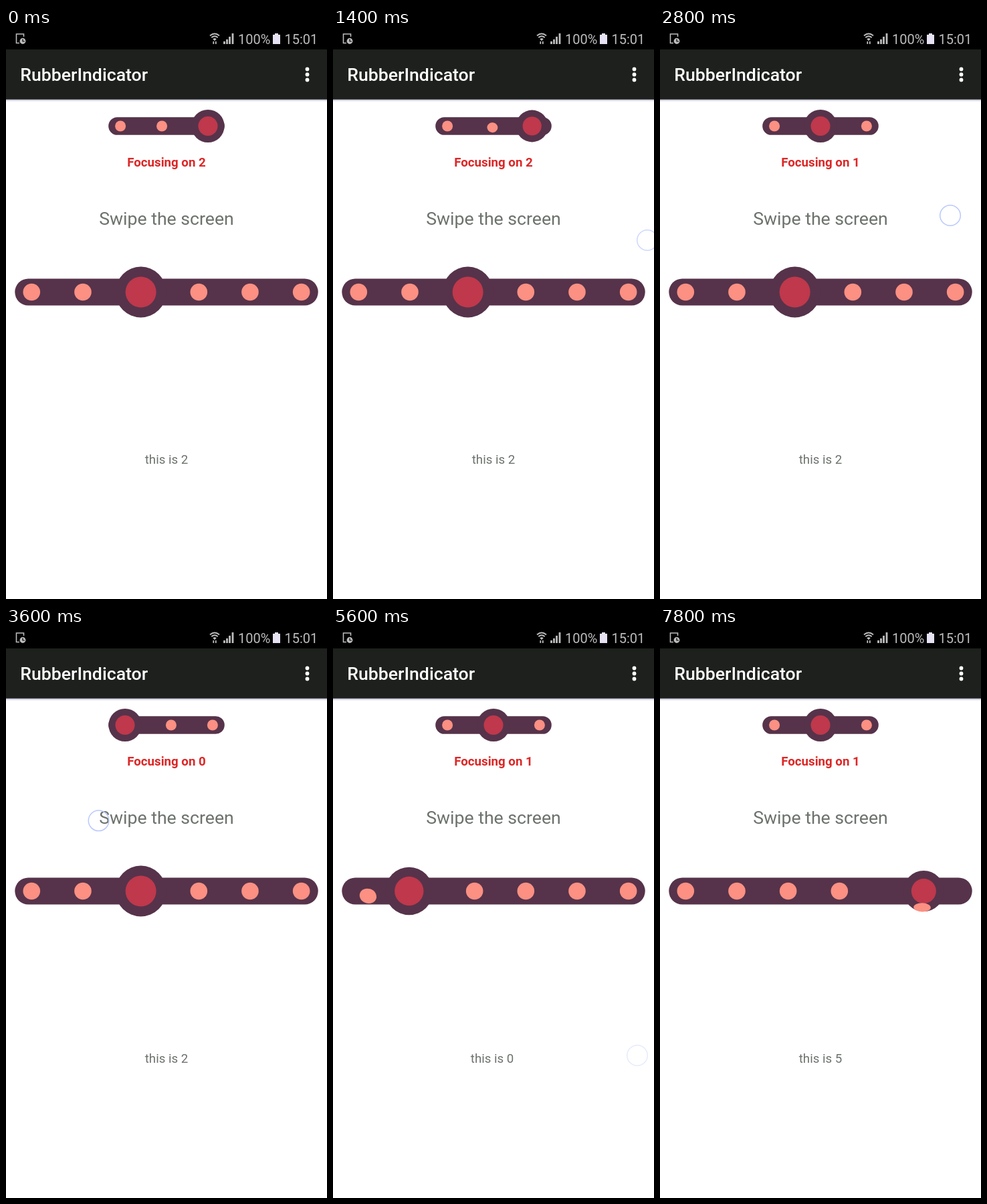
An HTML page for the animation above (8 s loop, 480 by 853 pixels).

```html
<!DOCTYPE html>
<html lang="en">
<head>
<meta charset="utf-8">
<title>RubberIndicator</title>
<style>
  html, body { margin: 0; width: 100%; height: 100%; overflow: hidden; background: #fff; }
  svg { display: block; width: 100%; height: 100%; }
  text { font-family: Roboto, sans-serif; }
  .centered { text-anchor: middle; }
  .body { font-size: 18.67px; fill: #6c726c; }
  .status { font-size: 20px; fill: #bdbdbd; }
</style>
</head>
<body>
<svg id="stage" viewBox="0 0 480 853">
  <defs>
    <linearGradient id="shadow" x2="0" y2="1">
      <stop stop-color="#a9a9c4"/><stop offset="1" stop-color="#fff"/>
    </linearGradient>
  </defs>
  <rect width="480" height="853" fill="#fff"/>
  <rect y="106" width="480" height="4" fill="url(#shadow)"/>
  <rect y="31" width="480" height="75.67" fill="#1d201c"/>
  <rect width="480" height="32"/>

  <g fill="none" stroke="#bdbdbd" stroke-width="1.6">
    <path d="M20 22.5H15.5V9H26.5V13"/>
    <circle cx="25" cy="19.5" r="4.4" fill="#bdbdbd" stroke="none"/>
    <path d="M25 16.5V20H28" stroke="#000" stroke-width="1.2"/>
    <path d="M305 11.5Q312 5.5 319 11.5M307.3 14.3Q312 10.2 316.7 14.3" stroke-width="1.9"/>
    <path d="M309.3 16.5Q312 14 314.7 16.5L312 19.2Z" fill="#bdbdbd" stroke="none"/>
    <path d="M310.3 20V24M313.8 20V24" stroke-width="1.8"/>
    <path d="M326.5 24V20M330.5 24V17M334.5 24V13M339 24V8" stroke-width="2.8"/>
  </g>
  <path d="M399 10H402V8H407V10H410V24H399Z" fill="#e6e2f4"/>
  <text class="status" x="347" y="23.5">100%</text>
  <text class="status" x="416.5" y="23.5">15:01</text>

  <text x="21.33" y="79.2" font-size="26.67" font-weight="500" fill="#fff">RubberIndicator</text>
  <g fill="#fff">
    <circle cx="450.5" cy="61.5" r="2.9"/><circle cx="450.5" cy="69.5" r="2.9"/><circle cx="450.5" cy="77.5" r="2.9"/>
  </g>

  <text id="label" class="centered" x="240" y="206.5" font-size="18.67" font-weight="700" fill="#de2626"></text>
  <text class="centered" x="240" y="294" font-size="26.67" fill="#6c726c">Swipe the screen</text>
  <g id="pages"></g>
  <g id="indicators"></g>
  <circle id="touch" r="15.3" fill="none" stroke="#b9c8ff" stroke-width="1.5"/>
</svg>
<script>
const LOOP = 8000, STEP = 200, MOVE = 417, SETTLE = 200, FADE = 250;
const COLORS = { bar: '#56334a', dot: '#fb9083', core: '#bf384c' };
const byId = id => document.getElementById(id);
const clamp = v => Math.max(0, Math.min(1, v));
const mix = (a, b, p) => a + (b - a) * p;
const ease = u => (1 - Math.cos(Math.PI * u)) / 2;
const peak = p => 1 - Math.abs(2 * p - 1);
const swing = p => p < .5 ? peak(2 * p) : -peak(2 * p - 1);

function add(parent, tag, attrs) {
  const node = document.createElementNS('http://www.w3.org/2000/svg', tag);
  set(node, attrs);
  return parent.appendChild(node);
}
function set(node, attrs) {
  for (const name in attrs) node.setAttribute(name, attrs[name]);
}

// Moves are [start time, target index], run one after another.
const topBar = {
  count: 3, first: 171.1, pitch: 62, extra: 6.9, y: 146.5, left: 153.2, half: 13.3,
  outer: 24.6, core: 14.5, dot: 8, dip: 15.6,
  focus: 2, moves: [[1329, 1], [2830, 0], [3680, 1]]
};
const bottomBar = {
  count: 6, first: 38.3, pitch: 76.67, extra: 10, y: 394.5, left: 13.3, half: 20,
  outer: 37.9, core: 23, dot: 12.8, dip: 25,
  focus: 2, moves: [[5079, 1], [5496, 0], [5920, 1], [6337, 2], [6754, 3], [7171, 4], [7588, 5]]
};

// Horizontal drags; pageStep is the page change they cause.
const swipe = (start, release, x0, x1, y0, y1, pageStep) => ({ start, release, x0, x1, y0, y1, pageStep });
const swipes = [
  swipe(900, 1329, 150, 470, 325, 317, 0),
  swipe(2400, 2800, 150, 434, 292, 280, 0),
  swipe(3300, 3650, 430, 90, 285, 290, 0),
  swipe(4600, 4960, 166, 455, 649, 642, -1),
  swipe(5200, 5443, 166, 455, 648, 640, -1),
  ...[5910, 6270, 6640, 7000, 7400].map(end => swipe(end - 200, end, 463, 91, 640, 641, 1))
];

function build(bar) {
  const group = add(byId('indicators'), 'g', {});
  add(group, 'rect', {
    x: bar.left, y: bar.y - bar.half, width: 480 - 2 * bar.left,
    height: 2 * bar.half, rx: bar.half, fill: COLORS.bar
  });
  bar.big = add(group, 'g', {});
  add(bar.big, 'circle', { r: bar.outer, fill: COLORS.bar });
  add(bar.big, 'circle', { r: bar.core, fill: COLORS.core });
  bar.dots = Array.from({ length: bar.count }, () => add(group, 'circle', { r: bar.dot, fill: COLORS.dot }));
}

function slot(bar, index, focus) {
  return bar.first + bar.pitch * index + bar.extra * (1 + Math.sign(index - focus));
}

// Draws the bar and returns the index it last settled on.
function drawBar(bar, t) {
  let from = bar.focus, to = from, p = 0;
  for (const [start, target] of bar.moves) {
    if (t < start) break;
    from = to;
    to = target;
    p = ease(clamp((t - start) / MOVE));
  }
  if (p === 1) from = to;
  const bump = peak(p);
  const bigX = mix(slot(bar, from, from), slot(bar, to, to), p);
  set(bar.big, { transform: `translate(${bigX} ${bar.y}) scale(${1 - .2 * bump})` });
  bar.dots.forEach((dot, i) => {
    const moving = i === to && from !== to;
    const hidden = i === from;
    let transform = `translate(${slot(bar, i, from)} ${bar.y})`;
    if (moving) {
      const x = mix(slot(bar, to, from), slot(bar, from, to), p);
      const tilt = 30 * swing(p) * Math.sign(from - to);
      transform = `translate(${x} ${bar.y + bar.dip * bump}) rotate(${tilt}) scale(1 ${1 - .5 * bump})`;
    }
    set(dot, { transform, visibility: hidden ? 'hidden' : 'visible' });
  });
  return from;
}

function pagePosition(t) {
  return swipes.reduce((position, s) => {
    const dragged = Math.abs(s.x1 - s.x0) / 480 * clamp((t - s.start) / (s.release - s.start));
    const settled = 1 - (1 - clamp((t - s.release) / SETTLE)) ** 3;
    return position + s.pageStep * mix(dragged, 1, settled);
  }, 2);
}

function drawTouch(t) {
  const s = swipes.filter(item => item.start <= t).pop();
  if (!s) return set(byId('touch'), { opacity: 0 });
  const u = clamp((t - s.start) / (s.release - s.start));
  set(byId('touch'), {
    cx: mix(s.x0, s.x1, u), cy: mix(s.y0, s.y1, u),
    opacity: 1 - clamp((t - s.release) / FADE)
  });
}

function draw(now) {
  const t = Math.floor(now % LOOP / STEP) * STEP;
  byId('label').textContent = `Focusing on ${drawBar(topBar, t)}`;
  drawBar(bottomBar, t);
  set(byId('pages'), { transform: `translate(${-480 * pagePosition(t)} 0)` });
  drawTouch(t);
}

[topBar, bottomBar].forEach(build);
for (let i = 0; i < 6; i++) {
  add(byId('pages'), 'text', { class: 'centered body', x: 240 + 480 * i, y: 651 }).textContent = `this is ${i}`;
}

const begin = performance.now();
function tick() {
  draw(performance.now() - begin);
  requestAnimationFrame(tick);
}
tick();
</script>
</body>
</html>
```
